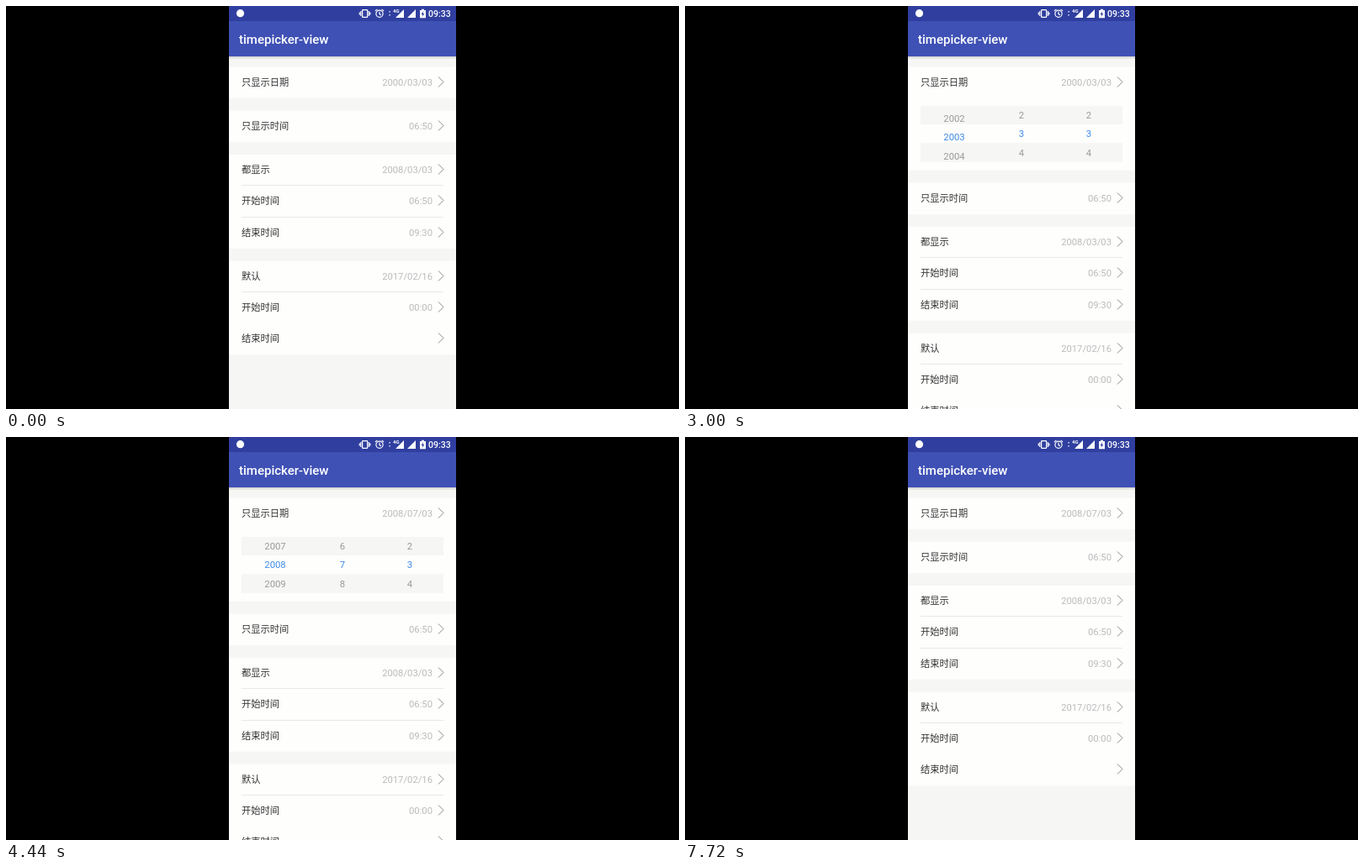
An HTML page that plays this animation: 800x480 px, repeating every 8 s.

```html
<!DOCTYPE html>
<html lang="zh">
<head>
<meta charset="utf-8">
<title>timepicker-view</title>
<style>
html, body { margin: 0; width: 100%; height: 100%; overflow: hidden; background: #000; }
svg { display: block; width: 800px; height: 480px; }
text { font: 11.25px Roboto, "Noto Sans CJK SC", "Noto Sans CJK", sans-serif; }
.label { fill: #333; }
.value { fill: #bbb; text-anchor: end; }
.item { fill: #999; text-anchor: middle; }
.item.on { fill: #3c8ae6; }
.arrow { fill: none; stroke: #888; stroke-width: 1; }
.line { fill: #e8e8e6; }
</style>
</head>
<body>
<svg viewBox="0 0 800 480">
  <defs>
    <clipPath id="screen"><rect x="265" y="0" width="270" height="480"/></clipPath>
    <clipPath id="window"><rect x="280" y="119" width="240" height="67"/></clipPath>
  </defs>
  <rect width="800" height="480" fill="#000"/>
  <g clip-path="url(#screen)">
    <rect x="265" width="270" height="480" fill="#f6f6f4"/>
    <g id="list"></g>
    <g id="wheel">
      <rect x="280" y="119" width="240" height="22" fill="#f6f6f4"/>
      <rect x="280" y="163" width="240" height="23" fill="#f6f6f4"/>
      <g id="items" clip-path="url(#window)"></g>
    </g>
    <rect x="265" y="60" width="270" height="1.5" fill="#d2d2d0"/>
    <rect x="265" y="61.5" width="270" height="1.5" fill="#e8e8e6"/>
    <rect x="265" y="18" width="270" height="42" fill="#3f51b5"/>
    <rect x="265" width="270" height="18" fill="#303f9f"/>
    <text x="277" y="45" fill="#fff" style="font-size:15px;font-weight:500">timepicker-view</text>
    <g fill="#fff">
      <circle cx="278.5" cy="8.7" r="4.6"/>
      <text x="502" y="13" style="font-size:10.5px;font-weight:500">09:33</text>
      <text x="460" y="8" style="font-size:6px;font-weight:700">4G</text>
      <path d="M455.5 6h1.2v1.4h-1.2zM455.5 10h1.2v1.4h-1.2zM463 14L473 4V14zM477 14L487 4V14z"/>
      <path d="M492 5h2v-1.2h3V5h2v9.2h-7z"/>
      <path d="M496.2 6L493.6 10h1.6l-.6 3 2.7-4h-1.6z" fill="#303f9f"/>
    </g>
    <g fill="none" stroke="#fff" stroke-width="1.2">
      <rect x="423.6" y="4.6" width="6" height="8.8" rx=".6"/>
      <path d="M421.8 6v6M431.4 6v6M420.3 7.5v3M432.9 7.5v3"/>
      <circle cx="444" cy="9.3" r="4.1"/>
      <path d="M444 6.8v2.8l2 1.2M438.9 6l2.5-2.1M449.1 6l-2.5-2.1"/>
    </g>
  </g>
</svg>
<script>
(() => {
  const LOOP = 8000, STEP = 40, ROW = 37.25, GAP = 15, PANEL = 86;
  const OPEN = 2040, CLOSE = 6040;
  const groups = [
    [["只显示日期", "2000/03/03"]],
    [["只显示时间", "06:50"]],
    [["都显示", "2008/03/03"], ["开始时间", "06:50"], ["结束时间", "09:30"]],
    [["默认", "2017/02/16"], ["开始时间", "00:00"], ["结束时间", ""]]
  ];
  const $ = id => document.getElementById(id);

  function add(parent, tag, attrs, text) {
    const node = document.createElementNS("http://www.w3.org/2000/svg", tag);
    for (const key in attrs) node.setAttribute(key, attrs[key]);
    if (text) node.textContent = text;
    return parent.appendChild(node);
  }

  const addCard = (parent, y, height) =>
    add(parent, "rect", { x: 265, y, width: 270, height, fill: "#fefefd" });

  function addRow(parent, y, label, value) {
    const mid = Math.round(y + ROW / 2 - 0.4);
    add(parent, "text", { x: 280, y: mid + 4, class: "label" }, label);
    add(parent, "path", { d: `M514 ${mid - 6.5}l6 6-6 6`, class: "arrow" });
    return add(parent, "text", { x: 507, y: mid + 4, class: "value" }, value);
  }

  // The first card grows; everything below it is shifted as one group.
  let rowY = 72.5;
  const card = addCard($("list"), rowY, ROW);
  const dateText = addRow($("list"), rowY, ...groups[0][0]);
  const rest = add($("list"), "g", {});
  rowY += ROW + GAP;

  groups.slice(1).forEach(rows => {
    addCard(rest, rowY, rows.length * ROW);
    rows.forEach(([label, value], i) => {
      addRow(rest, rowY, label, value);
      if (i && value)
        add(rest, "rect", { x: 280, y: Math.round(rowY) - 1, width: 240, height: 1, class: "line" });
      rowY += ROW;
    });
    rowY += GAP;
  });

  const columns = [320, 400, 480].map(x =>
    Array.from({ length: 5 }, () => add($("items"), "text", { x, class: "item" })));

  function spin(column, value) {
    const near = Math.round(value);
    column.forEach((node, i) => {
      const n = near + i - 2;
      node.textContent = n;
      node.setAttribute("y", 156 + (n - value) * 22.5);
      node.setAttribute("class", n === near ? "item on" : "item");
    });
  }

  const progress = (t, from, to) => Math.min(1, Math.max(0, (t - from) / (to - from)));
  const fling = p => 1 - Math.pow(1 - p, 1.5);
  const drag = p => 0.54 * p + 0.46 * p * p * (3 - 2 * p);

  function draw(ms) {
    const t = Math.floor(ms / STEP) * STEP;
    const open = t >= OPEN && t < CLOSE;
    const year = 2000 + 8 * fling(progress(t, 2800, 3600));
    const month = 3 + 4 * drag(progress(t, 3640, 4440));
    dateText.textContent = `${t < 3600 ? 2000 : 2008}/${t < 4440 ? "03" : "07"}/03`;
    card.setAttribute("height", ROW + (open ? PANEL : 0));
    rest.setAttribute("transform", `translate(0 ${open ? PANEL : 0})`);
    $("wheel").setAttribute("visibility", open ? "visible" : "hidden");
    [year, month, 3].forEach((value, i) => spin(columns[i], value));
  }

  const start = performance.now();
  function tick() {
    draw((performance.now() - start) % LOOP);
    requestAnimationFrame(tick);
  }
  tick();
})();
</script>
</body>
</html>
```
